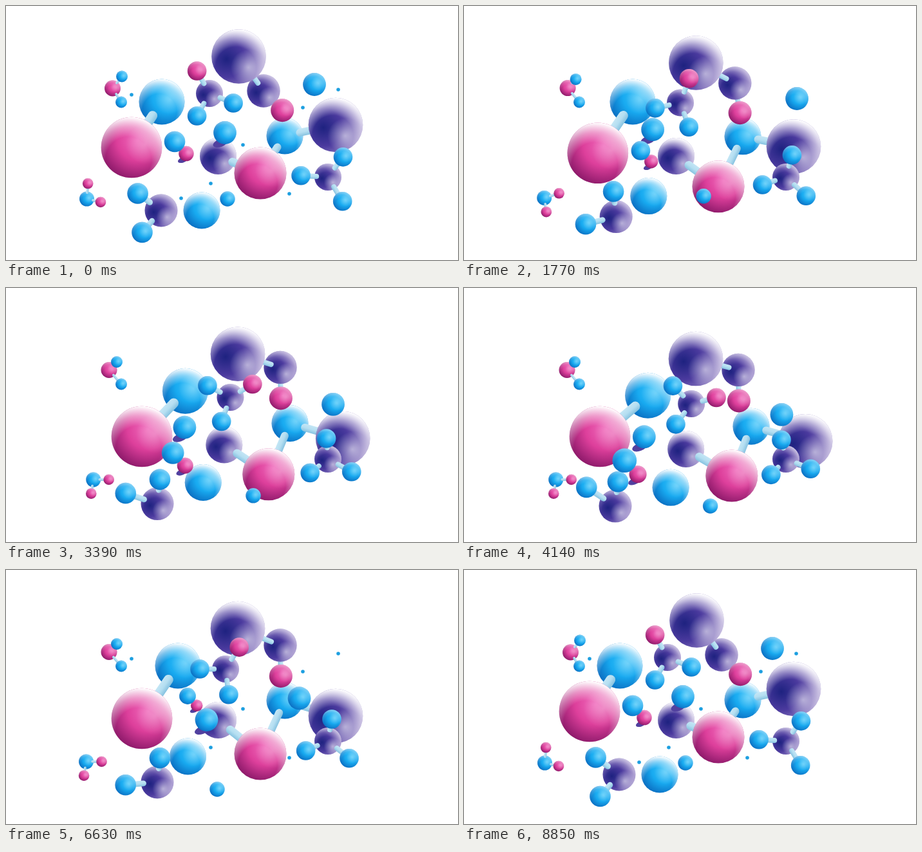
Animation, 702 px wide and 395 px high, one loop 9 s. Source, as an HTML page with a canvas:

```html
<!DOCTYPE html>
<html lang="en">
<head>
<meta charset="utf-8">
<title>Molecules</title>
<style>
  html, body { margin: 0; width: 100%; height: 100%; overflow: hidden; background: #fff; }
  canvas { display: block; }
</style>
</head>
<body>
<canvas id="stage" width="702" height="395"></canvas>
<script>
const ctx = document.getElementById('stage').getContext('2d');
const LOOP = 9000, STEP = 147.5, LAST = 60, HALF = 30, MID = 15;
let step = 0, phase = 0;

// tones run outward from the core point; glow is the highlight (in radii).
const SKINS = {
  blue: { core: [0.25, -0.2], glow: [0.35, -0.1], tones: ['#3cc3f9', '#18aaf0', '#0a6cc0'] },
  pink: { core: [0.2, -0.25], glow: [0.45, -0.1], tones: ['#f06cbc', '#dd3f9b', '#8a1868'] },
  purple: { core: [-0.45, 0.1], glow: [0.35, 0.4], tones: ['#1e2280', '#4b3a9e', '#9d8dca'] }
};

const point = (x, y) => ({ x, y });

// Keys at the start, middle and end of the forward half; rests on the last.
function mix(a, b, c = b) {
  return phase < MID ? a + (b - a) * phase / MID : b + (c - b) * (phase - MID) / MID;
}

function move(a, b, c = b) {
  return point(mix(a[0], b[0], c[0]), mix(a[1], b[1], c[1]));
}

function polar(center, degrees, dist) {
  const a = degrees * Math.PI / 180;
  return point(center.x + dist * Math.cos(a), center.y + dist * Math.sin(a));
}

// Steady turn around a moving center.
function turn(center, [a0, a1], [d0, d1], end = HALF) {
  const u = Math.min(1, phase / end);
  return polar(center, a0 + (a1 - a0) * u, d0 + (d1 - d0) * u);
}

// Closed smooth path with one key per quarter of the loop.
function circuit(...keys) {
  const pos = step / MID, i = Math.floor(pos), u = pos - i;
  const key = n => keys[(i + n + 4) % 4];
  return key(0).map((b, j) => {
    const a = key(-1)[j], c = key(1)[j], d = key(2)[j];
    return b + u / 2 * (c - a + u * (2 * a - 5 * b + 4 * c - d + u * (3 * (b - c) + d - a)));
  });
}

function fade(gradient, ...colors) {
  colors.forEach((color, i) => gradient.addColorStop(i / (colors.length - 1), color));
  return gradient;
}

function ball({ x, y }, r, skin) {
  const { core, glow, tones } = SKINS[skin], big = r > 26;
  const radial = ([ox, oy], inner, outer, ...colors) => fade(ctx.createRadialGradient(
    x + ox * r, y + oy * r, inner * r, x + ox * r, y + oy * r, outer * r), ...colors);
  const white = alpha => `rgba(255,255,255,${alpha})`;
  const layers = [
    radial(core, 0, 1.35, ...tones),
    radial(glow, 0, 0.65, white(skin === 'purple' ? 0.55 : 0.3), white(0)),
    radial([-0.1, 0.4], 0.75, 1.4, white(0), white(big ? 0.45 : 0.15), white(big ? 1 : 0.5))
  ];
  ctx.beginPath();
  ctx.arc(x, y, r, 0, 2 * Math.PI);
  for (ctx.fillStyle of layers) ctx.fill();
}

function bond(from, to, inset, width) {
  const angle = Math.atan2(to.y - from.y, to.x - from.x);
  const x = from.x + inset * Math.cos(angle), y = from.y + inset * Math.sin(angle);
  const side = Math.cos(angle) < 0 ? -1 : 1;
  const ox = Math.sin(angle) * width / 2 * side, oy = -Math.cos(angle) * width / 2 * side;
  ctx.lineCap = 'round';
  ctx.lineWidth = width;
  ctx.strokeStyle = fade(ctx.createLinearGradient(x + ox, y + oy, x - ox, y - oy),
    '#c4e6f5', '#b4def1', '#86c2e0');
  ctx.beginPath();
  ctx.moveTo(x, y);
  ctx.lineTo(to.x, to.y);
  ctx.stroke();
}

function smudge(x, y, size) {
  ctx.fillStyle = '#51409f';
  ctx.beginPath();
  ctx.ellipse(x, y, size, size / 2, -0.35, 0, 2 * Math.PI);
  ctx.fill();
}

// Center ball with satellites [position, radius, skin].
function cluster(center, r, skin, width, satellites) {
  ball(center, r, skin);
  satellites.forEach(([pos]) => bond(center, pos, r * 0.85, width));
  satellites.forEach(satellite => ball(...satellite));
}

function dots() {
  const shown = phase < 5 || (phase > 13 && phase < 20);
  if (!shown) return;
  ctx.fillStyle = '#1c9fe0';
  for (const [x, y] of [[195, 138], [461, 158], [516, 130], [368, 216], [318, 276], [272, 299], [440, 292]]) {
    ctx.beginPath();
    ctx.arc(x, y, 2.8, 0, 2 * Math.PI);
    ctx.fill();
  }
}

function cornerClusters() {
  cluster(move([165.5, 128], [160, 127.5]), 12.5, 'pink', 4, [
    [move([180, 109.5], [172, 115]), 9, 'blue'],
    [point(179, 149.5), 9, 'blue']
  ]);
  const core = move([125.5, 300], [124.5, 298], [145.5, 298]);
  cluster(core, 11.5, 'blue', 4, [
    [turn(core, [-86, 0], [24, 24], MID), 8.3, 'pink'],
    [turn(core, [13, 99], [22, 22], MID), 8.3, 'pink']
  ]);
}

function leftPair() {
  const blue = move([242, 149], [267, 149], [288.5, 170]);
  const pink = move([195, 220], [211, 231]);
  ball(blue, 35.5, 'blue');
  bond(blue, pink, 26, 15);
  ball(pink, 47.3, 'pink');
}

function lowerLeft() {
  ball(move([304, 318], [282.5, 290], [327, 313.5]), 28.5, 'blue');
  const core = move([241, 318], [235, 330], [235, 340.5]);
  cluster(core, 25.5, 'purple', 9, [
    [turn(core, [216, 276], [45, 38], MID), 16.3, 'blue'],
    [turn(core, [131, 219], [45, 54]), 16.3, 'blue']
  ]);
}

function chain() {
  const blue = move([433, 202], [433, 203], [448, 217]);
  const right = move([512, 185], [512, 227], [533, 240]);
  const mid = move([329.5, 233.5], [329.5, 233.5], [347, 253]);
  const pink = move([395, 260], [395, 286], [419, 293]);
  ball(blue, 28.5, 'blue');
  ball(mid, 28.5, 'purple');
  bond(blue, right, 24, 12);
  bond(blue, pink, 21, 12);
  bond(mid, pink, 24, 13);
  ball(right, 42.3, 'purple');
  ball(pink, 40.5, 'pink');

  const top = move([361.5, 78.5], [360, 91], [360, 113]);
  const joint = move([400, 132], [426, 117], [426, 129]);
  const tip = turn(joint, [46, 89], [42, 48], MID);
  bond(joint, tip, 22, 8);
  ball(joint, 25.7, 'purple');
  bond(joint, top, 15, 8);
  ball(top, 42.3, 'purple');
  ball(tip, 18, 'pink');
}

function spinner() {
  const core = move([316, 136], [341, 154], [355, 184]);
  const arm = (angle, skin) => [polar(core, angle + mix(0, 61, 112), 40), 14.8, skin];
  cluster(core, 21, 'purple', 8, [arm(-119, 'pink'), arm(22, 'blue'), arm(119, 'blue')]);
}

function lowerRight() {
  const core = point(500, 266);
  cluster(core, 21, 'purple', 8, [
    [turn(core, [-53, -107], [39, 30]), 14.8, 'blue'],
    [turn(core, [183, 130], [42, 33]), 14.8, 'blue'],
    [turn(core, [59, 19], [44, 41]), 14.8, 'blue']
  ]);
}

function drifters() {
  const small = circuit([344, 300], [377, 299], [380, 343], [328, 341]);
  const upper = circuit([479, 122], [521, 153], [488.5, 201], [455.5, 199.5]);
  const [bx, by] = circuit([340, 197], [284, 195], [281.5, 235], [311.5, 233]);
  ball(point(...small), 11.7, 'blue');
  ball(point(...upper), 17.9, 'blue');
  smudge(bx - 7, by + 16, 12);
  ball(point(bx, by), 17.9, 'blue');

  const [x, y, r] = circuit([262, 211, 16.3], [275, 230, 14.8], [248.5, 268, 18.9], [282, 196, 12.9]);
  const blue = point(x, y), pink = point(x + 1.1 * r, y + 1.14 * r);
  smudge(pink.x - 0.32 * r, pink.y + 0.6 * r, r / 2);
  bond(blue, pink, r * 0.9, r * 0.35);
  ball(pink, r * 0.72, 'pink');
  ball(blue, r, 'blue');
}

function draw(now) {
  step = Math.min(LAST, Math.floor(now % LOOP / STEP + 0.05));
  phase = HALF - Math.abs(HALF - step);
  ctx.fillStyle = '#fff';
  ctx.fillRect(0, 0, 702, 395);
  for (const part of [dots, cornerClusters, leftPair, lowerLeft, chain, spinner, lowerRight, drifters]) part();
}

const start = performance.now();
function tick() {
  draw(performance.now() - start);
  requestAnimationFrame(tick);
}
tick();
</script>
</body>
</html>
```
